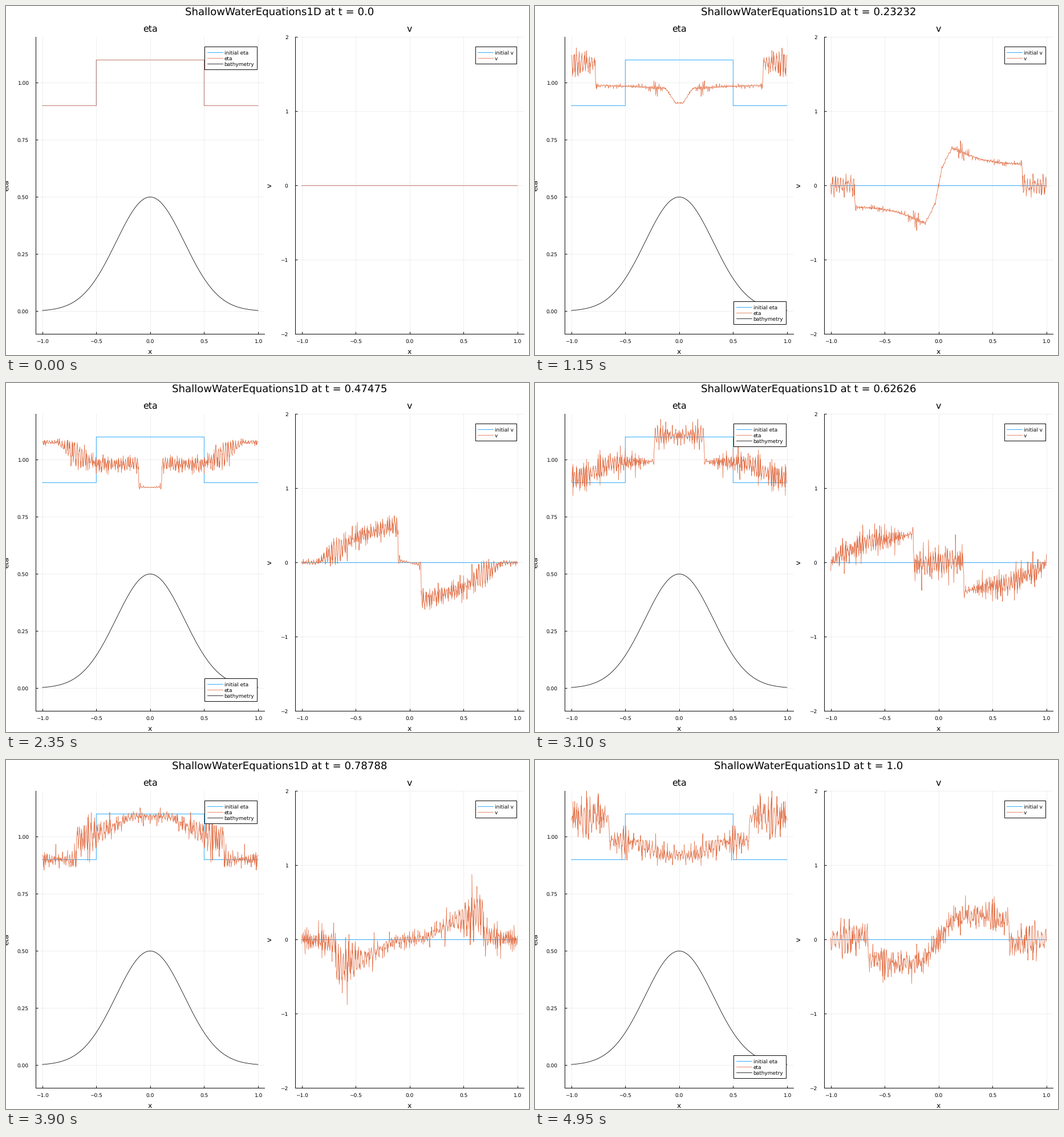
A matplotlib script that plays this animation: 917 by 611 pixels, repeating every 5000 ms.

```python
import numpy as np
import matplotlib.pyplot as plt
from matplotlib.animation import FuncAnimation
from matplotlib.patches import Rectangle

W, H, DPI = 917, 611, 100
PX = 72 / DPI
FRAMES, INTERVAL = 100, 50
BLUE, ORANGE, BLACK = "#009afa", "#e26f46", "#000000"
LINE, BORDER = 0.8 * PX, 0.95 * PX

plt.rcParams["font.family"] = "DejaVu Sans"
plt.rcParams["text.hinting"] = "none"
plt.rcParams["toolbar"] = "None"

# --- shallow water solver: entropy-conserving spectral elements ---------
G = 9.81
# Small steps keep the time integrator from damping the fine ripples
CELLS, SUBSTEPS = 128, 50
NODES = np.array([-1, -1 / np.sqrt(5), 1 / np.sqrt(5), 1])
END_WEIGHT = 1 / 6

powers = np.arange(4)
vander = NODES[:, None] ** powers
slopes = powers * NODES[:, None] ** np.maximum(powers - 1, 0)
DT_MATRIX = (slopes @ np.linalg.inv(vander)).T

centers = -1 + (np.arange(CELLS) + 0.5) * 2 / CELLS
x = centers[:, None] + NODES / CELLS
bed = 0.5 * np.exp(-5 * x**2)
eta0 = np.where(np.abs(centers)[:, None] < 0.5, 1.1, 0.9) + 0 * x


def with_walls(left, right, sign):
    """Values on both sides of every face, mirrored at the walls."""
    minus = np.concatenate(([sign * left[0]], right))
    plus = np.concatenate((left, [sign * right[-1]]))
    return minus, plus


def rates(state):
    h, m = state
    v = m / h
    mv = m * v
    dm = m @ DT_MATRIX
    dh = dm.copy()
    dq = 0.5 * (mv @ DT_MATRIX + m * (v @ DT_MATRIX) + v * dm)
    dq += G * h * ((h + bed) @ DT_MATRIX)

    hl, hr = with_walls(h[:, 0], h[:, -1], 1)
    ml, mr = with_walls(m[:, 0], m[:, -1], -1)
    mass = 0.5 * (ml + mr)
    momentum = mass * 0.5 * (ml / hl + mr / hr) + 0.5 * G * hl * hr
    flux = mv + 0.5 * G * h * h
    dh[:, 0] -= (mass[:-1] - m[:, 0]) / END_WEIGHT
    dh[:, -1] += (mass[1:] - m[:, -1]) / END_WEIGHT
    dq[:, 0] -= (momentum[:-1] - flux[:, 0]) / END_WEIGHT
    dq[:, -1] += (momentum[1:] - flux[:, -1]) / END_WEIGHT
    return -CELLS * np.array([dh, dq])


def simulate():
    state = np.array([eta0 - bed, 0 * x])
    dt = 1 / (FRAMES - 1) / SUBSTEPS
    result = [(eta0.ravel(), 0 * x.ravel())]
    for _ in range(FRAMES - 1):
        for _ in range(SUBSTEPS):
            k1 = rates(state)
            k2 = rates(state + dt / 2 * k1)
            k3 = rates(state + dt / 2 * k2)
            k4 = rates(state + dt * k3)
            state = state + dt / 6 * (k1 + 2 * k2 + 2 * k3 + k4)
        h, m = state
        result.append(((h + bed).ravel(), (m / h).ravel()))
    return result


history = simulate()
xs = x.ravel()

# --- figure --------------------------------------------------------------
fig = plt.figure(figsize=(W / DPI, H / DPI), dpi=DPI, facecolor="white")

# Overlay in pixel units, for text and legends
page = fig.add_axes([0, 0, 1, 1], zorder=5)
page.set_xlim(0, W)
page.set_ylim(H, 0)
page.axis("off")


def label(px, py, text, size, ha="center", **kw):
    return page.text(px, py, text, fontsize=size * PX, ha=ha,
                     va="baseline", rotation_mode="anchor", **kw)


def panel(left, right, ylim, yticks, yfmt, name, name_x):
    top, bottom = 54.4, 574.4
    ax = fig.add_axes([left / W, 1 - bottom / H,
                       (right - left) / W, (bottom - top) / H])
    ax.patch.set_visible(False)
    ax.set_xlim(-1.06, 1.06)
    ax.set_ylim(*ylim)
    xticks = np.linspace(-1, 1, 5)
    ax.set_xticks(xticks)
    ax.set_yticks(yticks)
    ax.tick_params(direction="in", length=4 * PX, width=BORDER,
                   labelbottom=False, labelleft=False)
    ax.set_axisbelow(True)
    ax.grid(color="black", alpha=0.1, linewidth=0.6 * PX)
    ax.spines[["top", "right"]].set_visible(False)
    ax.spines[["left", "bottom"]].set_linewidth(BORDER)

    mid = (left + right) / 2
    for t in xticks:
        px = left + (t + 1.06) / 2.12 * (right - left)
        label(px, 590.3, f"{t:.1f}".replace("-", "\u2212"), 9.05)
    for t in yticks:
        py = bottom - (t - ylim[0]) / (ylim[1] - ylim[0]) * (bottom - top)
        label(left - 12.6, py + 3.4, format(t, yfmt).replace("-", "\u2212"),
              9.05, ha="right")
    label(mid, 44.7, name, 15.9)
    label(mid, 608.6, "x", 12.4)
    label(name_x, (top + bottom) / 2, name, 12.4, rotation=90)
    return ax


def legend(left, top, width, entries):
    """Boxed key; returns its artists so that it can be toggled."""
    height = 10 * (len(entries) + 1)
    box = Rectangle((left, top), width, height, facecolor="white",
                    edgecolor="black", linewidth=BORDER, zorder=2)
    parts = [page.add_patch(box)]
    for i, (text, color) in enumerate(entries):
        y = top + 10 * (i + 1)
        parts += page.plot([left + 4.5, left + 31.5], [y, y], color=color,
                           lw=LINE, zorder=3)
        parts.append(label(left + 34.6, y + 3.4, text, 9.05, ha="left",
                           zorder=3))
    return parts


def curve(ax, y, color):
    return ax.plot(xs, y, color=color, lw=LINE, snap=False,
                   solid_joinstyle="round")[0]


ax_eta = panel(52.4, 453.2, (-0.1, 1.2), np.linspace(0, 1, 5), ".2f",
               "eta", 3.8)
ax_v = panel(507.2, 908.0, (-2, 2), np.arange(-2, 3), "d", "v", 465.8)

curve(ax_eta, eta0.ravel(), BLUE)
eta_line = curve(ax_eta, eta0.ravel(), ORANGE)
curve(ax_eta, bed.ravel(), BLACK)
curve(ax_v, 0 * xs, BLUE)
v_line = curve(ax_v, 0 * xs, ORANGE)

keys = [("initial eta", BLUE), ("eta", ORANGE), ("bathymetry", BLACK)]
upper = legend(348, 71.4, 92, keys)
lower = legend(348, 517.4, 92, keys)
legend(822.6, 71.4, 72.3, [("initial v", BLUE), ("v", ORANGE)])

title = label(479.9, 16, "", 18.1)
corner = xs > 0.53


def update(i):
    eta, v = history[i]
    eta_line.set_ydata(eta)
    v_line.set_ydata(v)
    time = round(i / (FRAMES - 1), 5)
    title.set_text(f"ShallowWaterEquations1D at t = {time}")
    # The key leaves the upper corner while the water is high there
    high = eta[corner].mean() > 0.97
    for part in upper:
        part.set_visible(not high)
    for part in lower:
        part.set_visible(high)
    return [eta_line, v_line, title, *upper, *lower]


anim = FuncAnimation(fig, update, frames=FRAMES, interval=INTERVAL,
                     repeat=True, repeat_delay=0, blit=False)
plt.show()
```
